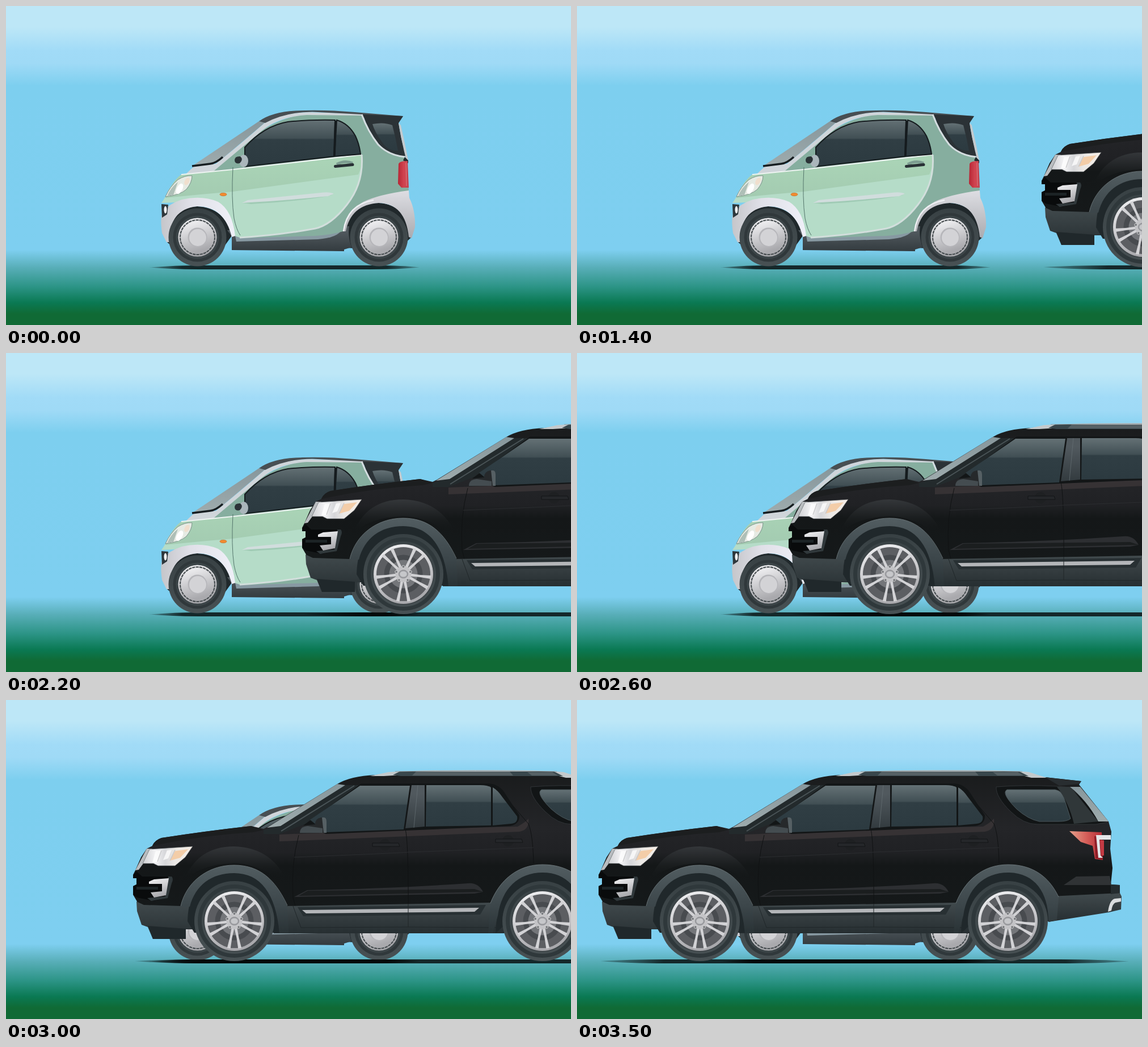
An HTML page that plays this animation: 996x562 px, repeating every 3600 ms.

```html
<!DOCTYPE html>
<html lang="en">
<head>
<meta charset="utf-8">
<title>Small car, large car</title>
<style>
html, body { margin: 0; width: 100%; height: 100%; overflow: hidden; background: #7ecff0; }
svg { display: block; width: 100vw; height: 100vh; }
.line { fill: none; }
</style>
</head>
<body>
<svg viewBox="0 0 996 562">
<defs>
  <linearGradient id="sky" x2="0" y2="562" gradientUnits="userSpaceOnUse">
    <stop offset=".065" stop-color="#bde7f7"/><stop offset=".14" stop-color="#a1dbf7"/>
    <stop offset=".18" stop-color="#9fdaf6"/><stop offset=".25" stop-color="#7dcfef"/>
    <stop offset=".765" stop-color="#7ecff0"/><stop offset=".82" stop-color="#58aeb8"/>
    <stop offset=".88" stop-color="#2c9486"/><stop offset=".93" stop-color="#0a7953"/>
    <stop offset=".965" stop-color="#106a35"/>
  </linearGradient>
  <linearGradient id="shade">
    <stop offset="0" stop-opacity=".2"/><stop offset=".12" stop-opacity=".77"/>
    <stop offset=".88" stop-opacity=".77"/><stop offset="1" stop-opacity=".2"/>
  </linearGradient>
  <linearGradient id="glass" x2="0" y2="1">
    <stop offset="0" stop-color="#647175"/><stop offset=".39" stop-color="#414f54"/>
    <stop offset=".42" stop-color="#303e44"/><stop offset="1" stop-color="#2c3a40"/>
  </linearGradient>
  <linearGradient id="screen" x2="0" y2="1">
    <stop offset="0" stop-color="#87979c"/><stop offset="1" stop-color="#9eabad"/>
  </linearGradient>
  <linearGradient id="tyre" x2="0" y2="1">
    <stop offset="0" stop-color="#384144"/><stop offset="1" stop-color="#485154"/>
  </linearGradient>
  <linearGradient id="metal" x2=".3" y2="1">
    <stop offset="0" stop-color="#f5f5f7"/><stop offset="1" stop-color="#a9a9ad"/>
  </linearGradient>
  <linearGradient id="silver">
    <stop offset="0" stop-color="#c5c6ca"/><stop offset=".4" stop-color="#e0e0e8"/><stop offset="1" stop-color="#eff0f8"/>
  </linearGradient>
  <linearGradient id="rearSilver" x2="0" y2="1">
    <stop offset="0" stop-color="#dedee3"/><stop offset="1" stop-color="#aaabb0"/>
  </linearGradient>
  <linearGradient id="under" x2="0" y2="1">
    <stop offset=".2" stop-color="#51595e"/><stop offset="1" stop-color="#333b3f"/>
  </linearGradient>
  <linearGradient id="red">
    <stop offset="0" stop-color="#b62635"/><stop offset=".55" stop-color="#d14450"/><stop offset="1" stop-color="#c24550"/>
  </linearGradient>
  <linearGradient id="mint" x2="0" y2="1">
    <stop offset="0" stop-color="#abd5b7"/><stop offset="1" stop-color="#a3cbb1"/>
  </linearGradient>
  <linearGradient id="coat" x2="0" y2="1">
    <stop offset="0" stop-color="#191b1c"/><stop offset=".35" stop-color="#242528"/>
    <stop offset=".5" stop-color="#202124"/><stop offset=".58" stop-color="#141718"/><stop offset="1" stop-color="#161a1b"/>
  </linearGradient>
  <linearGradient id="clad" x2="0" y2="1">
    <stop offset="0" stop-color="#414a4d"/><stop offset="1" stop-color="#262e31"/>
  </linearGradient>
  <linearGradient id="flare" x2="0" y2="1">
    <stop offset="0" stop-color="#525d61"/><stop offset=".6" stop-color="#3c464a"/><stop offset="1" stop-color="#293235"/>
  </linearGradient>
  <linearGradient id="wing" x2="0" y2="1">
    <stop offset="0" stop-color="#34373a"/><stop offset=".6" stop-color="#191c1d" stop-opacity="0"/>
  </linearGradient>
  <linearGradient id="tail">
    <stop offset="0" stop-color="#e6a18c"/><stop offset=".5" stop-color="#d6605a"/><stop offset="1" stop-color="#b22833"/>
  </linearGradient>
  <linearGradient id="lamp">
    <stop offset="0" stop-color="#cfd0d3"/><stop offset=".25" stop-color="#f2f2f4"/>
    <stop offset=".45" stop-color="#d6d7da"/><stop offset=".65" stop-color="#ece9e6"/><stop offset="1" stop-color="#f6eee6"/>
  </linearGradient>

  <g id="capWheel">
    <circle r="51" fill="url(#tyre)"/>
    <circle r="43" fill="#30383b"/>
    <circle r="38" fill="#3c4548"/>
    <circle r="34" fill="url(#metal)"/>
    <circle class="line" r="30.500" stroke="#4a5053" stroke-width="2.200" stroke-dasharray="5.200 1.188"/>
    <circle r="28" fill="url(#metal)"/>
    <circle r="17" fill="#b6b6ba"/>
    <circle r="15" cx=".5" cy=".5" fill="#d3d3d6"/>
  </g>

  <g id="alloyWheel">
    <circle r="70.5" fill="url(#tyre)"/>
    <circle class="line" r="61" stroke="#2f383b" stroke-width="7"/>
    <circle r="54" fill="#3c4346"/>
    <circle r="52.5" fill="url(#metal)"/>
    <circle r="47.5" fill="#5c5e62"/>
    <circle r="34" fill="#484b4f"/>
    <circle r="25" fill="#74767a"/>
    <g id="spokes"></g>
    <circle r="14" fill="#c3c3c6"/>
    <g id="bolts"></g>
    <ellipse rx="8" ry="7" fill="#a3a4a8" stroke="#85868a"/>
    <ellipse rx="6" ry="4.8" fill="#c6c7ca"/>
  </g>
</defs>

<rect width="996" height="562" fill="url(#sky)"/>

<g id="city">
  <path fill="url(#shade)" d="M253 460.5Q300 457 340 457H650Q700 457 729 460.5Q690 464 640 464H340Q290 464 253 460.5Z"/>
  <path fill="#20282b" d="M284 416Q283 355 337 353Q386 355 398 405L380 430H300ZM597 426V397Q602 347 657 347Q708 350 714 408L690 430Z"/>
  <path fill="url(#under)" d="M390 395L398 406V430L596 432V429L609 425Q602 404 605 388L560 390Z"/>
  <path fill="#8799a2" d="M404 405L406 415L550 411Q585 408 592 394L560 386Z"/>
  <!-- shell -->
  <path fill="#86ae9f" d="M358 291L416 246Q468 198 530 190L627 191Q640 222 660 246Q676 262 706 268L710 327Q640 333 604 370Q596 382 594 397Q575 403 545 405L412 409Z"/>
  <path fill="url(#screen)" d="M331 280L446 203L457 205Q410 245 374 275Z"/>
  <path fill="#cfd5da" d="M317 296L331 283L370 278Q408 248 456 206Q490 187 535 187L628 190L627 193L530 192Q482 195 452 219L366 291Z"/>
  <path fill="#484f53" d="M446 203Q468 187 510 184.500Q560 182 615 187L700 194L692 206L629 196L627 191L540 186.500Q492 187 457 206Z"/>
  <path class="line" stroke="#171d20" stroke-width="3.500" d="M328 282L360 278Q370 277 382 266"/>
  <path fill="#2b3236" d="M629 191L700 194L692 206Q697 239 706 266Q673 263 656 242Q638 219 629 191Z"/>
  <path fill="url(#glass)" d="M646 208Q666 204 681 210Q687 232 691 255Q674 256 663 240Q650 222 646 208Z"/>
  <path class="line" stroke="#d4dcdf" stroke-width="3" d="M627 191Q638 221 656 244Q674 263 704 266"/>
  <path fill="#c3cace" d="M692 206L696 210Q703 240 709 272H706Q697 239 692 206Z"/>
  <path fill="#22292c" d="M703 266L709 272V277L700 272Z"/>
  <!-- side panels -->
  <path fill="#b5dcc8" d="M274 347Q282 336 286 325Q298 306 309 297L400 288L627 262Q631 312 601 350Q573 386 545 392Q480 404 412 408L403 405Q395 370 374 352Q340 335 300 346Z"/>
  <path fill="url(#mint)" d="M281 338Q294 307 309 297L400 288L627 262Q629 280 621 297L400 327Q340 332 281 338Z"/>
  <path class="line" stroke="#eef4f2" stroke-width="2" d="M309 297L400 288L627 262"/>
  <path class="line" stroke="#d2dedc" stroke-width="3" d="M627 262Q631 312 601 350Q573 386 545 392Q480 404 412 408"/>
  <path class="line" stroke="#54756b" d="M400 284Q397 340 402 374Q406 394 413 404"/>
  <path fill="#a0cbb5" d="M416 347L432 349Q520 344 572 334L578 331Z"/>
  <path fill="#d1dddd" d="M416 347L426 342L555 329Q571 327 578 331L568 335Q500 342 430 346Z"/>
  <!-- windows -->
  <g stroke="#151b1e" stroke-width="2">
    <path fill="url(#glass)" d="M421 283V249Q455 211 497 204Q535 200 580 201L578 265Z"/>
    <path fill="url(#glass)" d="M583 201Q604 207 616 229Q623 244 625 261L579 265Z"/>
    <path class="line" stroke-width="3.500" d="M581 202L579 265"/>
  </g>
  <ellipse cx="419" cy="273" rx="8" ry="11" fill="#aab6bb"/>
  <path fill="#2b3337" d="M403 271Q404 264 413 265Q419 270 412 277Q403 279 403 271Z"/>
  <path class="line" stroke="#7d9d91" stroke-width="5" d="M583 279Q597 271 611 277"/>
  <path class="line" stroke="#293135" stroke-width="5" stroke-linecap="round" d="M580.500 282.500L611 279.500"/>
  <ellipse cx="383" cy="332" rx="6" ry="2.700" fill="#f28a2e" stroke="#c47536" stroke-width=".8"/>
  <!-- wings and lamps -->
  <path fill="url(#silver)" d="M283 416L275 400Q271 372 277 362Q288 348 310 341Q345 333 374 345Q399 360 404 405L398 407Q385 353 337 353Q287 358 288 416Z"/>
  <path fill="url(#rearSilver)" d="M594 397Q599 364 630 345Q657 332 710 325L711 338Q722 360 721 390L715 409L710 407Q704 348 657 347Q608 350 599 397Z"/>
  <path class="line" stroke="#eff0f4" stroke-width="2.500" d="M595 397Q601 350 648 342"/>
  <path fill="#2e373b" d="M274 349L286 350L284 367L275 373Z"/>
  <ellipse cx="281" cy="359" rx="2.500" ry="6.500" fill="#f3f5f6"/>
  <path fill="#e6ebe4" stroke="#7c938a" d="M281 336Q289 318 303 306Q316 298 328 299Q328 311 318 323Q307 333 281 336Z"/>
  <ellipse cx="306" cy="322" rx="5" ry="10" transform="rotate(28 306 322)" fill="#fff"/>
  <ellipse cx="319" cy="309" rx="4" ry="7" transform="rotate(28 319 309)" fill="#f0dfce"/>
  <path fill="#aebfb7" d="M284 335Q290 320 303 310L295 333Z"/>
  <path fill="url(#red)" d="M692 278Q694 273 708 273L710 320H697L691 313Z"/>
  <path class="line" stroke="#e27d83" stroke-width="1" d="M705 276L706 317"/>
  <use href="#capWheel" x="337.500" y="407.500"/>
  <use href="#capWheel" x="657.500" y="407.500"/>
</g>

<g id="suv" visibility="hidden">
  <path fill="url(#shade)" d="M41 460Q90 457 160 457H850Q925 457 973 460.500Q920 464 850 464H160Q90 464 41 460Z"/>
  <path fill="url(#coat)" d="M45 365V355L38 343V328L44 325V314H38V308L42 300L52 277L62 262L72 257Q76 247 88 243Q165 231 246 222L268 227L276 223L398 148Q421 134 465 132Q570 125 700 126L825 136L889 143L885 149L937 214L942 232L940 262L944 296L941 325L957 326V365L835 388L690 411H300L150 400Z"/>
  <!-- bonnet and wing -->
  <path fill="#1c1e1f" d="M72 257Q76 247 88 243Q165 231 246 222L268 229L250 233Q160 238 72 257Z"/>
  <path fill="url(#wing)" d="M128 318Q151 258 216 258Q286 260 312 326L322 348Q280 290 216 287Q157 290 128 318Z"/>
  <path fill="#232a2c" d="M268 229L290 222L412 150L440 150L340 219L296 236H268Z"/>
  <path fill="url(#screen)" d="M274 225L398 148L412 150L298 222Z"/>
  <path class="line" stroke="#4a5457" stroke-width="2" d="M299 231L428 151"/>
  <path fill="#363234" d="M296 237L518 228L716 223Q730 215 735 209Q737 229 719 232L400 245L296 249Z"/>
  <!-- doors -->
  <path fill="#2d2f32" d="M322 347L345 335Q500 332 628 323Q646 321 655 338L640 341Z"/>
  <path fill="#1b1e1f" d="M330 345L346 336L640 333L655 338Z"/>
  <path class="line" stroke="#101213" d="M330 238Q316 290 320 348L334 399M524 150L518 228Q524 250 523 400M676 150L735 218Q743 238 744 288"/>
  <path class="line" stroke="#2b2d30" d="M322 277Q500 270 524 268L744 260"/>
  <g id="handle">
    <ellipse cx="482" cy="255" rx="10" ry="10" fill="#1e2022"/>
    <path fill="#25272a" stroke="#131516" d="M460 252H506L508 258H460Z"/>
  </g>
  <use href="#handle" x="217" y="-7"/>
  <!-- windows -->
  <path fill="#131617" d="M338 221L440 147H664Q682 148 692 162L719 203Q720 218 703 222L378 236Z"/>
  <path fill="url(#glass)" d="M350 211L438 151H526L515 228L377 233Z"/>
  <path fill="url(#under)" d="M529 150H552V223L518 226Z"/>
  <path class="line" stroke="#687276" stroke-width=".7" d="M540 150L533 225"/>
  <path fill="url(#glass)" d="M555 150H650Q663 150 669 154V221L554 223Z"/>
  <path fill="url(#glass)" d="M672 154Q681 159 689 171L715 205Q717 217 704 218L672 221Z"/>
  <path fill="#121516" stroke="#303437" d="M739 153Q790 149 846 152L870 154L935 215L915 219H812Q787 219 765 197Q738 171 739 153Z"/>
  <path fill="url(#glass)" stroke="#495559" d="M758 158H843Q854 160 858 171L870 209Q865 214 848 214H815Q795 210 775 192Q747 164 758 158Z"/>
  <path fill="#303739" d="M846 153H870L919 214L876 218Q867 180 846 153Z"/>
  <path fill="url(#screen)" d="M869 153H887L937 214H919Q898 176 869 153Z"/>
  <path fill="#282d30" d="M825 136L889 143L885 148L850 151Z"/>
  <path fill="#26292b" d="M332 235Q331 222 341 221L359 219Q359 209 369 207Q379 205 379 214V234Z"/>
  <path fill="#566064" d="M371 207Q379 205 379 214V234H374Z"/>
  <path fill="#444c50" d="M332 234Q332 223 346 222L372 226V234Z"/>
  <!-- roof rail -->
  <path fill="#c4cacd" d="M456 134L488 127Q560 123 650 123.500Q760 123 797 127L828 137H801L785 133H496L480 134Z"/>
  <path fill="#39474c" d="M496 132L508 126H780L796 134H510Z"/>
  <path fill="#566165" d="M537 126H702L708 133H530ZM733 127H777L787 133H741Z"/>
  <path class="line" stroke="#8f999c" d="M500 126Q640 123 785 126"/>
  <!-- front lamps -->
  <path fill="#b9bdc0" d="M42 300L62 262H72L56 288L48 299Z"/>
  <path fill="url(#lamp)" stroke="#62676a" stroke-width=".7" d="M55 288L67 263L143 258L130 277L112 292H82L74 288Z"/>
  <path fill="#f3cda8" d="M112 266L135 263L121 278L103 283Z"/>
  <path fill="#fff" d="M78 266L89 264L82 286H72ZM98 265L106 264L100 279L91 282Z" opacity=".75"/>
  <path class="line" stroke="#c9c9cb" stroke-width="1.500" d="M88 265L81 285M112 264L103 283"/>
  <path fill="#090b0c" d="M44 302L54 311H102L105 317L96 349L75 354L45 348L38 343V328L44 325V314H38V308Z"/>
  <path fill="#30383b" d="M100 311H106Q110 315 106 323L99 349L70 354L63 349L95 346Z"/>
  <path fill="url(#metal)" d="M66 320L75 316L101 314L96 344L75 348L69 339L89 337V324H66Z"/>
  <path fill="#1c2325" d="M44 329H82V334H44Z"/>
  <!-- cladding -->
  <path fill="url(#clad)" d="M44 355L57 361L122 363H155V404H131V421H73L64 400L53 396L45 372Z"/>
  <path fill="#20282b" d="M64 398L131 403V421H73Z"/>
  <path fill="url(#clad)" d="M304 363L668 357L705 385L690 411H286L287 390Z"/>
  <path fill="#283033" d="M328 365L660 361L650 378L338 381Z"/>
  <path fill="#b4b6b9" d="M336 370L648 366L640 373L343 376Z"/>
  <path class="line" stroke="#202729" d="M320 363L334 401L523 400V359M523 400L680 401"/>
  <path fill="url(#clad)" d="M835 346L957 340L960 346L959 369L938 374L831 391Z"/>
  <path fill="#242c2f" d="M941 325L957 326V340L941 342Z"/>
  <path fill="#303335" d="M858 326L880 311L939 310L942 326Z"/>
  <path fill="#d9dcde" d="M936 373Q939 352 948 350L959 349V355L949 357Q944 359 942 371Z"/>
  <path fill="url(#tail)" d="M868 231L925 233L927 282L913 280L909 257L888 250Z"/>
  <path fill="#8f1d27" d="M912 240H926L927 281L914 279Z"/>
  <path fill="#c33a43" d="M922 247H929V274H924Z"/>
  <path fill="#e5e6e8" d="M915 238H941V246H921L923 274L927 278H919Z"/>
  <!-- arches -->
  <path fill="#20282b" d="M134 390Q136 302 216 300Q286 302 298 410H146Z"/>
  <path fill="url(#flare)" d="M122 364C132 320 170 291 216 291C262 291 289 317 310 363L312 411H296C290 340 262 305 216 305C176 305 148 326 138 364Z"/>
  <path class="line" stroke="#758084" stroke-width=".8" d="M122 363C132 320 170 291 216 291C262 291 289 317 310 362"/>
  <path fill="#20282b" d="M677 411Q681 302 760 300Q825 302 836 390H700Z"/>
  <path fill="url(#flare)" d="M668 358C684 317 716 290 760 290C803 290 832 311 849 347L846 388L831 391C832 340 807 304 760 304C717 304 688 332 681 380L672 411H664Z"/>
  <path class="line" stroke="#758084" stroke-width=".8" d="M668 358C684 317 716 290 760 290C803 290 832 311 849 347"/>
  <use href="#alloyWheel" x="216.500" y="389.500"/>
  <use href="#alloyWheel" x="759.500" y="389.500"/>
</g>
</svg>
<script>
const LOOP = 3600, ENTER = 1000, STEP = 100, STEPS = 25, STRIDE = 37.2;
const $ = id => document.getElementById(id);

// Five pairs of slim spokes, with a bolt between the pairs.
const around = draw => Array.from({ length: 5 }, (_, i) => draw(i * 72)).join('');
$('spokes').innerHTML = around(a => [-11.5, 11.5].map(d =>
  `<path transform="rotate(${a + d})" fill="#d2d2d5" d="M-2.500 10L-2 30L-3 49H3L2 30L2.500 10Z"/>`).join(''));
$('bolts').innerHTML = around(a =>
  `<circle transform="rotate(${a})" cy="-13" r="2.400" fill="#77797d" stroke="#dededf" stroke-width=".8"/>`);

const suv = $('suv');
const start = performance.now();

function draw(now) {
  const t = Math.max(0, now - start) % LOOP;
  const n = Math.min(STEPS, Math.floor((t - ENTER) / STEP));
  suv.setAttribute('visibility', n < 0 ? 'hidden' : 'visible');
  suv.setAttribute('transform', `translate(${Math.round((STEPS - n) * STRIDE)} 0)`);
  requestAnimationFrame(draw);
}
draw(start);
</script>
</body>
</html>
```
